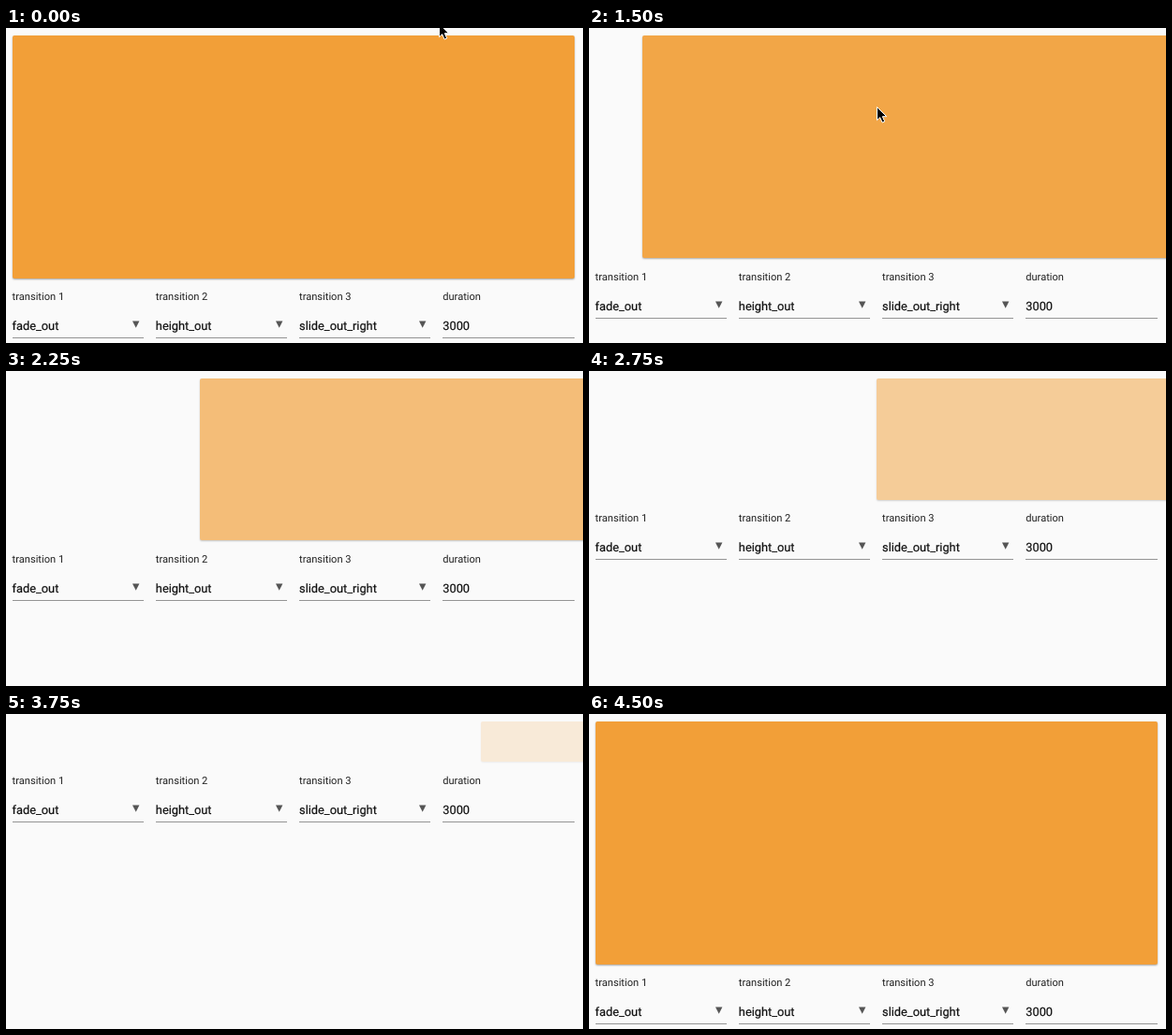
An HTML page for the animation above (4750 ms loop, 616 px wide and 337 px high).

```html
<!DOCTYPE html>
<html lang="en">
<head>
<meta charset="utf-8">
<style>
html, body { margin: 0; width: 100%; height: 100%; overflow: hidden; background: #fafafa; }
#stage { position: relative; width: 100%; height: 100%; overflow: hidden; contain: strict; }
#box {
  position: absolute; left: 7px; top: 8px; width: 600px; height: 260px;
  border-radius: 2px; background: #f29f38;
  box-shadow: 0 1px 2px rgba(0, 0, 0, .35);
}
svg { position: absolute; left: 0; top: 0; width: 100%; height: 100%; }
text { font-family: Roboto, sans-serif; fill: #212121; text-rendering: geometricPrecision; }
.label { font-size: 11.1px; }
.value { font-size: 12.8px; fill: #111; stroke: #111; stroke-width: .2px; }
.arrow { fill: #555; }
.line { fill: #949494; }
</style>
</head>
<body>
<div id="stage">
  <div id="box"></div>
  <svg>
    <g id="fields"></g>
    <path id="cursor" d="M0 0V14.2L3.2 11.2L5.6 16.6L8.2 15.5L5.8 10.2H10.2Z" fill="#000" stroke="#fff" stroke-width="1"/>
  </svg>
</div>
<script>
const LOOP = 4750, STEP = 250, START = 1250, DURATION = 3000;
const box = document.getElementById('box');
const fields = document.getElementById('fields');
const cursor = document.getElementById('cursor');

const columns = [
  ['transition 1', 'fade_out'],
  ['transition 2', 'height_out'],
  ['transition 3', 'slide_out_right'],
  ['duration', '3000']
];
fields.innerHTML = columns.map(([label, value], i) => {
  const last = i === columns.length - 1;
  const textX = -.4 + .22 * i;
  return `<g transform="translate(${7 + 153 * i} 0)">
    <text class="label" x="${textX}" y="291">${label}</text>
    <text class="value" x="${textX}" y="322.6">${value}</text>
    ${last ? '' : '<path class="arrow" d="M128 313.6h7.4l-3.7 7.2z"/>'}
    <rect class="line" y="331" width="${last ? 141 : 140}" height="1"/>
  </g>`;
}).join('');

// Pointer stops: [time, x, y]
const stops = [[0, 462.5, -4.5], [250, 346, 61], [750, 309.5, 84], [1000, 307.5, 84.5]];
const POINTER_END = 2000;

function render(t) {
  const running = t < START + DURATION + STEP;
  const p = running ? Math.min(1, Math.max(0, (t - START) / DURATION)) : 0;
  box.style.height = Math.round(260 * (1 - p)) + 'px';
  box.style.opacity = 1 - p;
  box.style.transform = `translateX(${600 * p}px)`;
  // The form keeps a small gap once the box is gone
  const shift = Math.min(246, Math.floor(260 * p));
  fields.setAttribute('transform', `translate(0 ${-shift})`);

  const [, x, y] = stops.filter(s => s[0] <= t).pop();
  cursor.setAttribute('transform', `translate(${x} ${y})`);
  cursor.style.display = t < POINTER_END ? '' : 'none';
}

function tick() {
  const t = performance.now() % LOOP;
  render(Math.floor(t / STEP) * STEP);
  requestAnimationFrame(tick);
}
tick();
</script>
</body>
</html>
```
